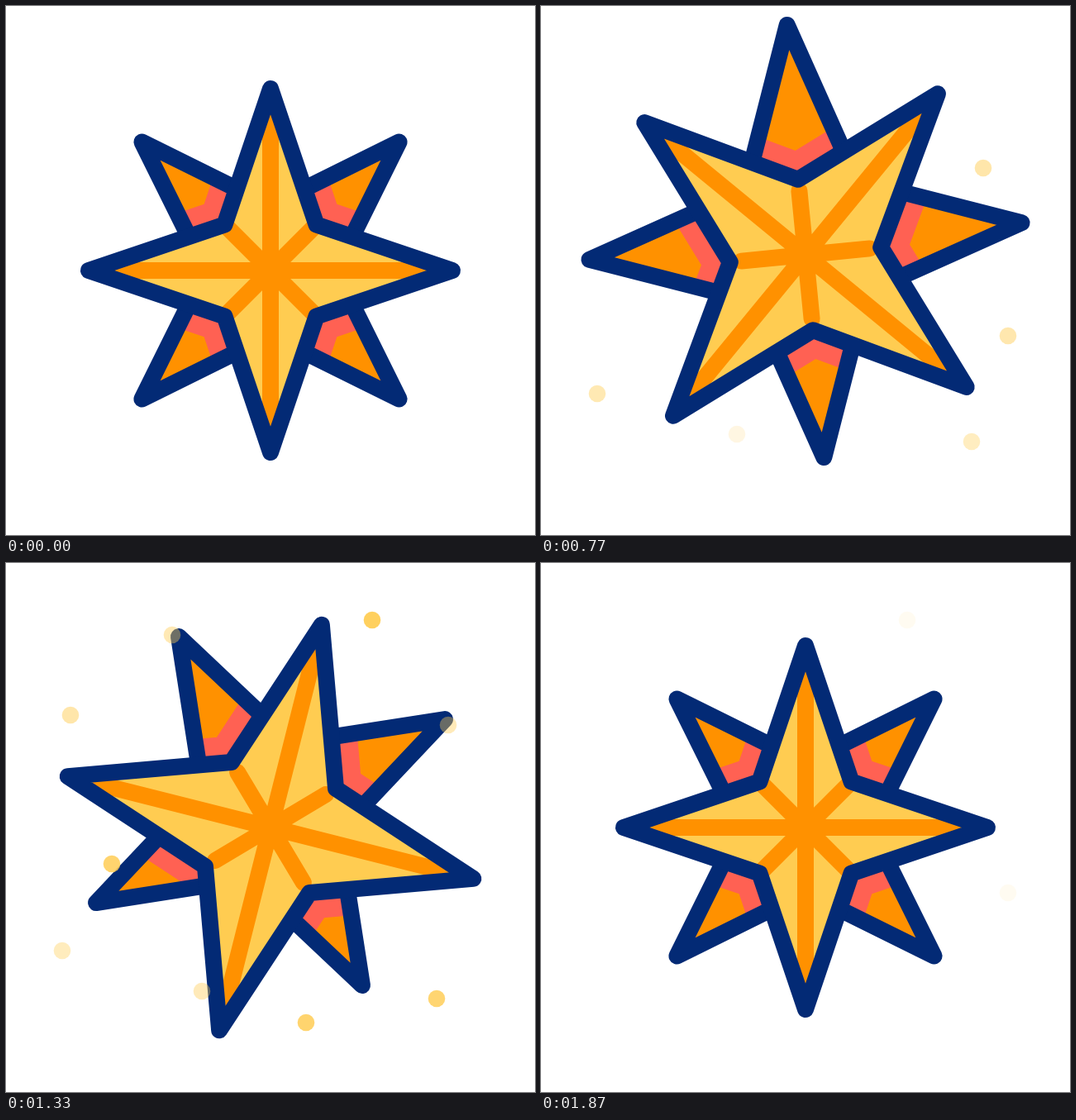
Recreate the animation shown at these times as an HTML page with a canvas. Size 640 by 640 pixels, loop 2 s.

```html
<!DOCTYPE html>
<html>
<head>
<meta charset="utf-8">
<style>
html, body { margin: 0; width: 100%; height: 100%; overflow: hidden; background: #fff; }
canvas { display: block; width: 100vmin; height: 100vmin; }
</style>
</head>
<body>
<canvas id="stage" width="640" height="640"></canvas>
<script>
const ctx = document.getElementById('stage').getContext('2d');
const NAVY = '#032a75', ORANGE = '#ff9100', PINK = '#ff6153', YELLOW = '#ffcc51';
const FPS = 30, LOOP = 2000, LAST = 56, MID = 320;

// Smooth monotone curve through [step, value] points, held at both ends
function curve(pts) {
  const n = pts.length - 1;
  const sec = i => (pts[i + 1][1] - pts[i][1]) / (pts[i + 1][0] - pts[i][0]);
  const slope = pts.map((p, i) => {
    if (i === 0) return sec(0);
    if (i === n) return sec(n - 1);
    const a = sec(i - 1), b = sec(i);
    return a * b <= 0 ? 0 : 2 * a * b / (a + b);
  });
  return x => {
    if (x <= pts[0][0]) return pts[0][1];
    if (x >= pts[n][0]) return pts[n][1];
    let i = 0;
    while (x > pts[i + 1][0]) i++;
    const [x0, y0] = pts[i], [x1, y1] = pts[i + 1];
    const h = x1 - x0, u = (x - x0) / h, v = 1 - u;
    return y0 * v * v * (1 + 2 * u) + y1 * u * u * (3 - 2 * u)
      + h * u * v * (slope[i] * v - slope[i + 1] * u);
  };
}

const turn = curve([[2.25, 0], [11, 13], [18, 29.5], [23, 39.4], [29, 68.6],
  [35, 133.9], [46, 267.45], [51, 324], [56, 360]]);
const frontGrow = curve([[2, 0], [11, 11], [23, 32], [29, 32.3], [40, 33], [46, 27], [56, 0]]);
const frontLift = curve([[2, 0], [11, 12], [19, 23], [23, 19], [29, 11.5], [35, 4], [38.5, 0]]);
const backGrow = curve([[2, 0], [11, 18.4], [18, 34.5], [23, 42.5], [24, 42.8],
  [29, 35.6], [35, 26.6], [46, 8.4], [51.5, 0]]);
const backLift = curve([[2, 0], [11, 14], [18, 26], [23, 35.5], [25, 37.3],
  [29, 33], [35, 26], [46, 12.5], [56, 0]]);

// x, y, then pulses as [start, peak, end] in ms
const dots = [
  [201, 87, [90, 420, 620], [960, 1050, 1150], [1180, 1540, 1690]],
  [535, 196, [100, 520, 1000], [1200, 1530, 1690]],
  [565, 399, [90, 500, 1000], [1580, 1720, 1880]],
  [68, 469, [90, 520, 960], [1220, 1520, 1670]],
  [363, 556, [90, 420, 640], [1030, 1300, 1500]],
  [237, 518, [400, 600, 800], [1200, 1530, 1680]],
  [521, 527, [420, 620, 850], [1140, 1300, 1480]],
  [443, 69, [1100, 1320, 1500], [1580, 1720, 1880]],
  [78, 184, [1110, 1570, 1800]],
  [128, 364, [1080, 1300, 1500]]
];

function star(cy, deg, grow) {
  const path = new Path2D();
  for (let i = 0; i < 8; i++) {
    const r = i % 2 ? 78.5 + 0.41 * grow : 220 + grow;
    const a = (deg + i * 45) * Math.PI / 180;
    path.lineTo(MID + r * Math.sin(a), cy - r * Math.cos(a));
  }
  path.closePath();
  return path;
}

function stroke(path, color, width, join) {
  ctx.strokeStyle = color;
  ctx.lineWidth = width;
  ctx.lineJoin = join;
  ctx.stroke(path);
}

function fill(path, color) {
  ctx.fillStyle = color;
  ctx.fill(path);
}

function rays(cy, deg) {
  const path = new Path2D();
  for (let i = 0; i < 8; i++) {
    const r = i % 2 ? 78 : 212;
    const a = (deg + i * 45) * Math.PI / 180;
    path.moveTo(MID, cy);
    path.lineTo(MID + r * Math.sin(a), cy - r * Math.cos(a));
  }
  return path;
}

function pulse([start, peak, end], t) {
  return Math.max(0, Math.min((t - start) / (peak - start), (end - t) / (end - peak)));
}

function draw(step) {
  ctx.fillStyle = '#fff';
  ctx.fillRect(0, 0, 640, 640);

  const cy = MID - frontLift(step), deg = turn(step);
  const front = star(cy, deg, frontGrow(step));
  const back = star(MID - backLift(step), turn(step + 0.25) + 45, backGrow(step));

  fill(back, ORANGE);
  ctx.save();
  ctx.clip(back);
  stroke(front, PINK, 63, 'miter');
  ctx.restore();
  stroke(back, NAVY, 20, 'round');

  fill(front, YELLOW);
  ctx.lineCap = 'round';
  stroke(rays(cy, deg), ORANGE, 20, 'round');
  stroke(front, NAVY, 20, 'round');

  const t = step * 1000 / FPS;
  for (const [x, y, ...pulses] of dots) {
    ctx.globalAlpha = t < 90 ? 0 : Math.max(...pulses.map(p => pulse(p, t)));
    const dot = new Path2D();
    dot.arc(x, y, 10.3, 0, Math.PI * 2);
    fill(dot, YELLOW);
  }
  ctx.globalAlpha = 1;
}

const begin = performance.now();
function tick() {
  const t = Math.max(0, performance.now() - begin) % LOOP;
  draw(Math.min(LAST, Math.floor(t * FPS / 1000 + 0.12)));
  requestAnimationFrame(tick);
}
tick();
</script>
</body>
</html>
```
